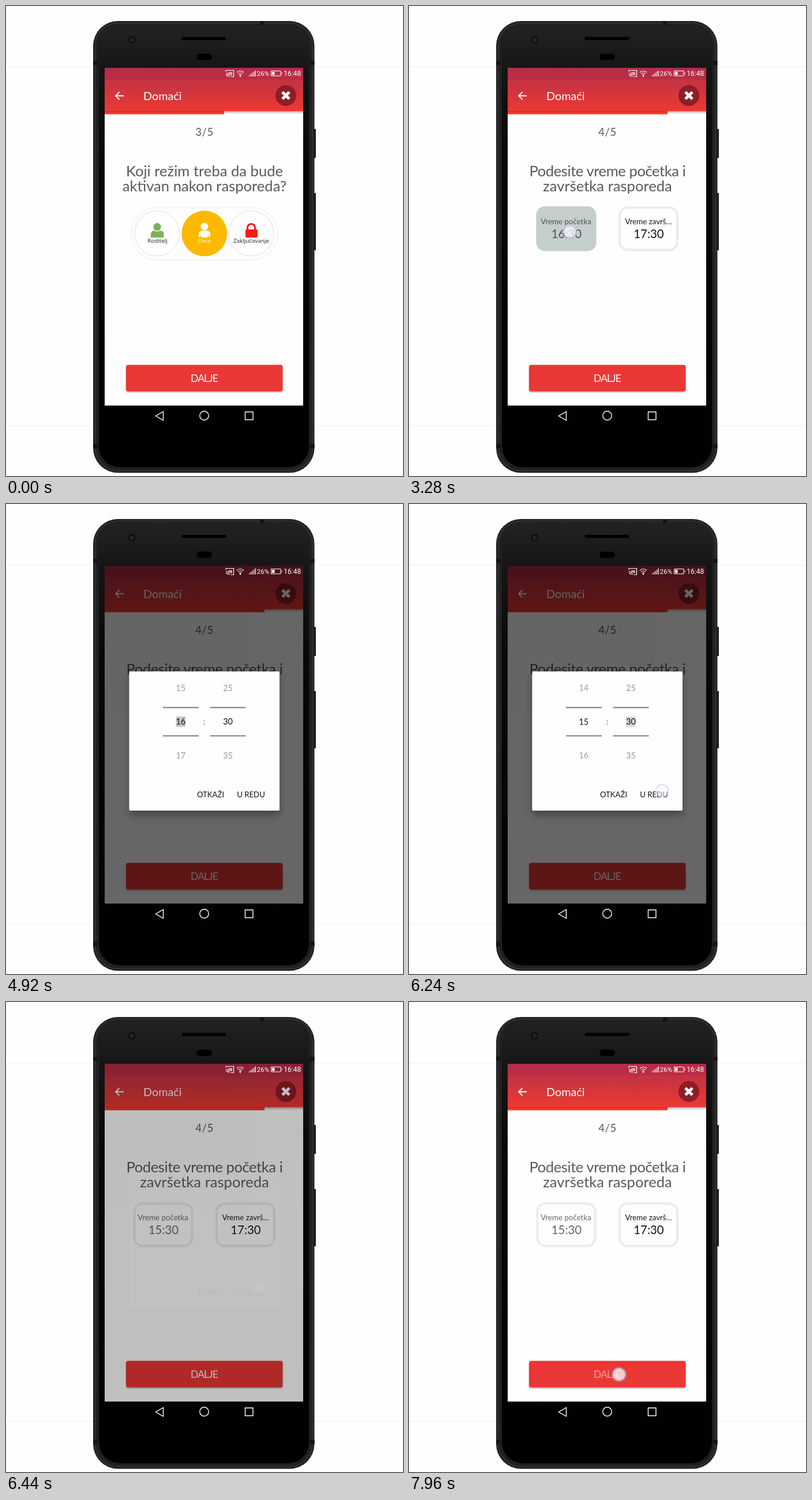
Recreate the animation shown at these times as an HTML page. Size 688 px wide and 814 px high, loop 8000 ms.

```html
<!DOCTYPE html>
<html lang="sr-Latn">
<head>
<meta charset="utf-8">
<title>Raspored</title>
<style>
  html, body { margin: 0; width: 100%; height: 100%; overflow: hidden; background: #fefefe; }
  svg { display: block; width: 100vw; height: 100vh; }
  text { font-family: Lato, "Open Sans", sans-serif; text-anchor: middle; fill: #5a5a5a; }
  .heading { font-size: 25.6px; }
  .tight { letter-spacing: -.43px; }
  .count { font-size: 18.5px; letter-spacing: .6px; }
  .label { font-size: 13.3px; fill: #1d120e; }
  .time { font-size: 20.4px; fill: #1d120e; }
  .mode { font: 9.8px "Noto Sans", sans-serif; fill: #26323c; }
  .status text { font: 12px Roboto, sans-serif; fill: #fff; }
  .action { font-size: 13.2px; fill: #1d120e; }
  .wheel text { font-size: 14.4px; fill: #9a9a9a; }
  .wheel .now text { fill: #111; }
  .line { fill: none; stroke: #fff; }
  #progress { transform-origin: 171px 0; }
</style>
</head>
<body>
<svg viewBox="0 0 688 814">
  <defs>
    <linearGradient id="face" x2="0" y2="1">
      <stop stop-color="#222"/><stop offset=".1" stop-color="#151515"/>
      <stop offset=".3" stop-color="#080808"/><stop offset="1" stop-color="#000"/>
    </linearGradient>
    <linearGradient id="bar" x2="0" y2="1">
      <stop stop-color="#be304a"/><stop offset=".35" stop-color="#c73341"/><stop offset="1" stop-color="#ec3a32"/>
    </linearGradient>
    <linearGradient id="shade" x2="0" y2="1">
      <stop stop-color="#a8a8a8"/><stop offset="1" stop-color="#fefefe"/>
    </linearGradient>
    <filter id="lift" x="-20%" y="-20%" width="140%" height="150%">
      <feDropShadow dx="0" dy="8" stdDeviation="7" flood-opacity=".32"/>
    </filter>
    <filter id="soft" x="-5%" y="-20%" width="110%" height="150%">
      <feDropShadow dx="0" dy="1.5" stdDeviation="1" flood-opacity=".35"/>
    </filter>
    <clipPath id="outer"><path d="M265 300h160v53h-160zM265 400h160v55h-160z"/></clipPath>
    <clipPath id="middle"><path d="M265 353h160v47h-160z"/></clipPath>
  </defs>

  <path d="M0 105.5H688M0 726.5H688" stroke="#efefef"/>

  <!-- phone -->
  <path d="M533 213h4v50h-4zM533 324h4v99h-4z" fill="#1c1c1c"/>
  <rect x="151" y="26" width="383.5" height="782.5" rx="43" fill="#202020"/>
  <rect x="154.500" y="29.500" width="376.500" height="775.500" rx="40" fill="none" stroke="#2f2f2f" stroke-width="2.500"/>
  <rect x="161" y="35" width="364" height="764" rx="36" fill="url(#face)"/>
  <path d="M440 26h7v7h-7zM151 95h8v7h-8zM526.500 95h8v7h-8zM151 758h8v8h-8zM526.500 758h8v8h-8z" fill="#141414"/>
  <rect x="304" y="53" width="78" height="6.5" rx="3" fill="#000" stroke="#262626" stroke-width=".7"/>
  <rect x="330" y="82.5" width="27" height="11" rx="5.5" fill="#000"/>
  <circle cx="218" cy="58.500" r="7" fill="#0c0c0c" stroke="#222"/>
  <circle cx="218" cy="58.500" r="3" fill="#1b1f24" stroke="#444" stroke-width=".8"/>
  <g class="line" stroke-width="1.4">
    <path d="M272.500 702.500v15l-13-7.500z"/>
    <circle cx="343.500" cy="709.500" r="7.700"/>
    <path d="M414.500 703h13.500v13.500h-13.500z"/>
  </g>

  <!-- app -->
  <path d="M171 107h344v585h-344z" fill="#fefefe"/>
  <path d="M171 107h344v76h-344z" fill="url(#bar)"/>
  <path d="M171 107h344v20.500h-344z" fill="#8c1f48" opacity=".2"/>
  <path d="M171 182h344v5h-344z" fill="url(#shade)"/>
  <g id="progress">
    <path d="M171 182h344v5.500h-344z" fill="#f2382c"/>
    <path d="M171 182h344v1.200h-344z" fill="#c52d2b"/>
  </g>
  <path class="line" d="M204 155.500h-14m6.500-6.500l-6.500 6.500l6.500 6.500" stroke-width="1.800"/>
  <text x="271.300" y="162.500" style="font-size:19.800px;fill:#fff">Domaći</text>
  <circle cx="485" cy="155" r="18" fill="#8e1d27"/>
  <path class="line" d="M479 149l12 12m0-12l-12 12" stroke-width="5.200"/>

  <g id="modes">
    <text class="count" x="344" y="225">3/5</text>
    <text class="heading" x="344" y="295">Koji režim treba da bude</text>
    <text class="heading" x="344" y="321">aktivan nakon rasporeda?</text>
    <rect x="217" y="349" width="254" height="91" rx="45.500" fill="#fdfdfd" stroke="#f4f4f4" stroke-width="2"/>
    <g fill="#fefefe" stroke="#dedede">
      <circle cx="262" cy="394" r="39"/><circle cx="425" cy="394" r="39"/>
    </g>
    <circle cx="343.800" cy="394" r="39.500" fill="#fdb900"/>
    <g fill="#7fb058">
      <circle cx="262" cy="382.500" r="6.700"/>
      <path d="M251 401v-5q0-7 6-7q5 3 10 0q6.500 0 6.500 7v5z"/>
    </g>
    <g fill="#fff">
      <circle cx="343.800" cy="382" r="6.400"/>
      <path d="M334 400v-6q1-5 6-5h8q5 0 6 5v6h-3v-4l-2 5h-10l-2-5v4z"/>
    </g>
    <path d="M418.500 388v-4.500a6.500 6 0 0 1 13 0v4.500" fill="none" stroke="#f51d16" stroke-width="3.200"/>
    <rect x="415" y="387" width="21" height="14" rx="1.500" fill="#f51d16"/>
    <text class="mode" x="262.500" y="409.500">Roditelj</text>
    <text class="mode" x="343.800" y="409.500" style="fill:#fff3cf">Dete</text>
    <text class="mode" x="425" y="409.500">Zaključavanje</text>
  </g>

  <g id="times">
    <text class="count" x="344" y="225">4/5</text>
    <text class="heading tight" x="344" y="295">Podesite vreme početka i</text>
    <text class="heading" x="344" y="321">završetka rasporeda</text>
    <g fill="#fefefe" stroke="#ececec" stroke-width="4">
      <rect x="222.500" y="349" width="100" height="73.500" rx="14"/>
      <rect x="365" y="349" width="100" height="73.500" rx="14"/>
    </g>
    <rect id="pressed" x="220.500" y="347" width="104" height="77.500" rx="15" fill="#c4cecd"/>
    <g id="start">
      <text class="label" x="272" y="378">Vreme početka</text>
      <text class="time" id="before" x="273" y="402">16:30</text>
      <text class="time" id="after" x="273" y="402">15:30</text>
    </g>
    <text class="label" x="415" y="378">Vreme završ…</text>
    <text class="time" x="415.500" y="402">17:30</text>
  </g>

  <rect x="208" y="621.500" width="271.500" height="46" rx="4" fill="#e93936" filter="url(#soft)"/>
  <text id="next" x="343.500" y="651" style="font-size:17.500px;letter-spacing:-.900px;fill:#fff">DALJE</text>

  <path id="dim" d="M171 107h344v585h-344z"/>
  <circle id="spot" cx="184" cy="115" r="8.500" fill="#300"/>

  <g class="status">
    <g class="line" stroke-width="1.200">
      <path d="M381 114v-2.500h13.500v11h-5M381 116.500a6 6 0 0 1 6 6M381 119.300a3.200 3.200 0 0 1 3.200 3.200"/>
      <path d="M400 115a8.500 8.500 0 0 1 12 0M402.200 117.500a5.500 5.500 0 0 1 7.600 0M404.300 119.800a2.600 2.600 0 0 1 3.400 0"/>
      <path d="M422 122v-2.500M424.600 122v-4.500M427.200 122v-6.500M429.800 122v-8.500M432.400 122v-10.500"/>
      <path d="M459.500 112.500h16.500v8.500h-16.500zM478 115v3.500" stroke-width="1"/>
    </g>
    <path d="M385 114.500h7v5.500h-3l-4-4z" fill="#fff" opacity=".6"/>
    <path d="M461 114h4.500v5.500h-4.500z" fill="#fff"/>
    <circle cx="406" cy="121.500" r="1.200" fill="#fff"/>
    <text x="445.500" y="120.500" style="font-size:11.500px">26%</text>
    <text x="496.300" y="121">16:48</text>
  </g>

  <g id="dialog">
    <rect x="213.500" y="290" width="260.500" height="241" rx="2" fill="#fefefe" filter="url(#lift)"/>
    <path id="hourMark" d="M294.500 368h16.500v18h-16.500z" fill="#c6c6c6"/>
    <path id="minuteMark" d="M376 368h17v18h-17z" fill="#dadada"/>
    <g class="wheel" id="wheel"></g>
    <text x="343.500" y="382" style="font-size:14px">:</text>
    <path d="M272 352.500h62m19.500 0h62M272 401.500h62m19.500 0h62" stroke="#7d7d7d" stroke-width="1.800"/>
    <text class="action" x="354.500" y="507.500">OTKAŽI</text>
    <text class="action" x="424.500" y="507.500">U REDU</text>
  </g>

  <g id="pointer">
    <circle r="13" fill="#c9c6e2" opacity=".35"/>
    <circle r="10.300" fill="#fff" fill-opacity=".66" stroke="#c8c9e6" stroke-opacity=".8" stroke-width="1.500"/>
  </g>
</svg>
<script>
const LOOP = 8000, STEP = 58.5;
const $ = id => document.getElementById(id);

// The same numbers twice: grey outside the rules, black between them.
const column = (x, first, gap, count, top) => Array.from({ length: count },
  (_, i) => `<text x="${x}" y="${top + i * STEP}">${first + i * gap}</text>`).join('');
const numbers = `<g class="hours">${column(302.8, 13, 1, 6, 206.8)}</g>${column(384.5, 25, 5, 3, 323.8)}`;
$('wheel').innerHTML =
  `<g clip-path="url(#outer)">${numbers}</g><g class="now" clip-path="url(#middle)">${numbers}</g>`;

// stops: [time in ms, value]; two stops at one time make a hard change.
function track(el, prop, stops, easing = 'linear') {
  const all = [[0, stops[0][1]], ...stops, [LOOP, stops.at(-1)[1]]];
  el.animate(all.map(([t, v]) => ({ offset: t / LOOP, [prop]: v, easing })),
    { duration: LOOP, iterations: Infinity });
}
const fade = (id, ...stops) => track($(id), 'opacity', stops);
const at = (x, y) => `translate(${x}px, ${y}px)`;

fade('modes', [1560, 1], [1700, 0]);
fade('times', [1560, 0], [1700, 1]);
track($('progress'), 'transform', [[1560, 'scaleX(.602)'], [1800, 'scaleX(.806)']], 'ease-out');
fade('next', [1320, 1], [1420, .5], [1520, .5], [1680, 1], [7760, 1], [7900, .52]);

fade('pressed', [3080, 0], [3220, 1], [4080, 1], [4080, 0]);
fade('start', [3080, 1], [3220, .65]);
fade('before', [6260, 1], [6260, 0]);
fade('after', [6260, 0], [6260, 1]);

fade('dim', [3700, 0], [4020, .6], [6300, .6], [6540, 0]);
fade('dialog', [3700, 0], [3888, 1], [6290, 1], [6446, 0]);
fade('spot', [3800, 0], [3860, .55], [3900, .55], [4000, 0]);

document.querySelectorAll('.hours').forEach(el =>
  track(el, 'transform', [[5000, at(0, 0)], [5400, at(0, STEP)]], 'ease-in-out'));
fade('hourMark', [4960, 1], [4960, 0]);
fade('minuteMark', [4960, 0], [4960, 1]);

const next = at(364, 645), box = at(279, 391), ok = at(438.5, 496.5);
track($('pointer'), 'transform', [
  [2400, next], [2400, box], [4400, box], [4400, at(299, 365)],
  [4980, at(299, 365)], [5360, at(299, 430)], [5600, at(299, 430)],
  [5600, ok], [6900, ok], [6900, next]
]);
fade('pointer',
  [1240, 0], [1340, 1], [1500, 1], [1640, 0],
  [3000, 0], [3120, 1], [3480, 1], [3640, 0],
  [4920, 0], [4980, .9], [5360, .9], [5480, 0],
  [5720, 0], [5900, 1], [6120, 1], [6240, .7], [6440, .12], [6500, 0],
  [7680, 0], [7800, 1]);
</script>
</body>
</html>
```
